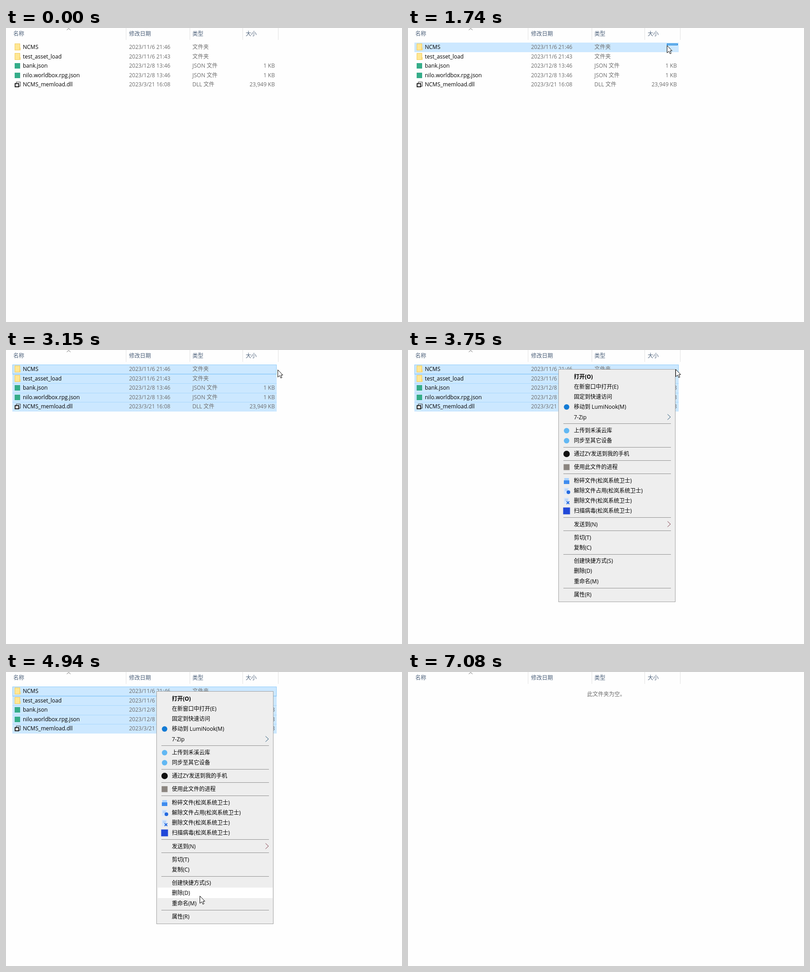
Animation, 869 px wide and 645 px high, one loop 7500 ms. Source, as an HTML page with a canvas:

```html
<!DOCTYPE html>
<html lang="zh-CN">
<head>
<meta charset="utf-8">
<title>文件夹</title>
<style>
html, body { margin: 0; width: 100%; height: 100%; overflow: hidden; background: #fefefe; }
canvas { display: block; }
</style>
</head>
<body>
<canvas id="stage" width="869" height="645"></canvas>
<script>
const ctx = document.getElementById('stage').getContext('2d');
const LOOP = 7500, TICK = 48;
const FONT = '12px "Open Sans", "Noto Sans CJK SC", "Noto Sans CJK", sans-serif';
const INK = '#000', GREY = '#6d6d6d', HEAD = '#4c607a';

const time = { drag: 1690, drop: 2200, menuOpen: 3750, menuClose: 5260, empty: 5730 };
const list = { left: 14, top: 32, width: 580, pitch: 20.5 };
const menu = { left: 330, top: 42, width: 257, height: 511, pitch: 22.25, gap: 6.95 };
const press = { x: 592, y: 34 };

const columns = [
  { label: '名称', x: 16, right: 263 },
  { label: '修改日期', x: 270, right: 403 },
  { label: '类型', x: 409, right: 519 },
  { label: '大小', x: 526, right: 597 }
];
const files = [
  { icon: 'folder', name: 'NCMS', date: '2023/11/6 21:46', kind: '文件夹' },
  { icon: 'folder', name: 'test_asset_load', date: '2023/11/6 21:43', kind: '文件夹' },
  { icon: 'json', name: 'bank.json', date: '2023/12/8 13:46', kind: 'JSON 文件', size: '1 KB' },
  { icon: 'json', name: 'nilo.worldbox.rpg.json', date: '2023/12/8 13:46', kind: 'JSON 文件', size: '1 KB' },
  { icon: 'dll', name: 'NCMS_memload.dll', date: '2023/3/21 16:08', kind: 'DLL 文件', size: '23,949 KB' }
];

// One string per menu group, entries split by "|", each "label" or "label;icon".
const menuGroups = [
  '打开(O)|在新窗口中打开(E)|固定到快速访问|移动到 LumiNook(M);cloud|7-Zip;more',
  '上传到禾溪云库;disk|同步至其它设备;disk',
  '通过ZY发送到我的手机;chat',
  '使用此文件的进程;lock',
  '粉碎文件(松岚系统卫士);shred|解除文件占用(松岚系统卫士);release|删除文件(松岚系统卫士);erase|扫描病毒(松岚系统卫士);scan',
  '发送到(N);send',
  '剪切(T)|复制(C)',
  '创建快捷方式(S)|删除(D)|重命名(M)',
  '属性(R)'
].map(group => group.split('|').map(entry => entry.split(';')));

const smooth = u => u * u * (3 - 2 * u);
const overshoot = u => 1 + 2.7 * (u - 1) ** 3 + 1.7 * (u - 1) ** 2;
const windUp = u => 2.7 * u ** 3 - 1.7 * u ** 2;

// Pointer moves chain from one resting place to the next; bow bends the path sideways.
const moves = [
  { start: 140, end: 820, from: [518, 648], to: [728, 227], bow: .63 },
  { start: 910, end: 1410, to: [360, -12] },
  { start: 1410, end: 1660, to: [592, 28], bow: -.1 },
  { start: 1690, end: 2020, to: [179, 200] },
  { start: 2200, end: 2920, from: [250, 33], to: [600, 43], ease: overshoot },
  { start: 2970, end: 3340, to: [587, 42] },
  { start: 4100, end: 4780, to: [425, 491] },
  { start: 6580, end: 7080, to: [441, 650], ease: windUp }
];
moves.forEach((move, i) => move.from = move.from || moves[i - 1].to);

function pointerAt(t) {
  const { start, end, from, to, bow = 0, ease = smooth } = moves.filter(m => m.start <= t).pop() || moves[0];
  const elapsed = Math.max(0, Math.floor((t - start) / TICK) * TICK);
  const u = t >= end ? 1 : ease(elapsed / (end - start));
  const dx = to[0] - from[0], dy = to[1] - from[1];
  const bend = 2 * u * (1 - u) * bow;
  return [from[0] + dx * u - dy * bend, from[1] + dy * u + dx * bend].map(Math.round);
}

function box(x, y, w, h, color) {
  ctx.fillStyle = color;
  ctx.fillRect(x, y, w, h);
}

function frame(x, y, w, h, color, width = 1) {
  ctx.strokeStyle = color;
  ctx.lineWidth = width;
  ctx.strokeRect(x + width / 2, y + width / 2, w - width, h - width);
}

function disc(x, y, r, color) {
  ctx.fillStyle = color;
  ctx.beginPath();
  ctx.arc(x, y, r, 0, Math.PI * 2);
  ctx.fill();
}

function square(x, y, side, color) {
  box(x - side / 2, y - side / 2, side, side, color);
}

function line(points, color, width = 1) {
  ctx.strokeStyle = color;
  ctx.lineWidth = width;
  ctx.beginPath();
  points.forEach(([x, y]) => ctx.lineTo(x, y));
  ctx.stroke();
}

function text(label, x, mid, color, align = 'left', weight = '') {
  ctx.font = weight + ' ' + FONT;
  ctx.textAlign = align;
  ctx.fillStyle = color;
  ctx.fillText(label, x, Math.round(mid + 4));
}

function page(x, y) {
  box(x - 6, y - 7, 11, 14, '#d9e8fc');
  for (const dy of [-4, -1]) box(x - 4, y + dy, 7, 1, '#8db9f2');
}

function chevron(y, color) {
  line([[569.5, y - 7], [576, y - 1], [569.5, y + 5]], color);
}

// Icons are drawn around their centre.
const icons = {
  folder(x, y) {
    box(x - 6, y - 8, 12, 15, '#ffe794');
    frame(x - 6, y - 8, 12, 15, '#f2cb5c');
    box(x + 4, y + 1, 3, 6, '#f7d777');
  },
  json: (x, y) => square(x, y, 12, '#35ad89'),
  dll(x, y) {
    frame(x - 3, y - 6, 10, 10, '#333');
    box(x - 6, y - 3, 10, 9, '#fff');
    frame(x - 6, y - 3, 10, 9, '#222', 2);
  },
  cloud: (x, y) => disc(x, y, 6, '#137bd5'),
  disk: (x, y) => disc(x, y, 6, '#62b8f3'),
  chat: (x, y) => disc(x, y, 7, '#111'),
  lock: (x, y) => square(x, y, 13, '#8b8580'),
  scan: (x, y) => square(x, y, 15, '#2148d8'),
  shred(x, y) {
    box(x - 5, y - 6, 10, 6, '#a9d2ff');
    box(x - 6, y - 1, 12, 8, '#3f8cee');
  },
  release(x, y) {
    page(x, y);
    disc(x + 4, y + 3, 4, '#2469df');
  },
  erase(x, y) {
    page(x, y);
    for (const s of [-3, 3]) line([[x + 3 - s, y + 1], [x + 3 + s, y + 7]], '#2469df', 2);
  },
  more: (x, y) => chevron(y, '#1b4f72'),
  send: (x, y) => chevron(y, '#7a3040')
};

function drawHeader(x, y) {
  let left = 0;
  for (const { label, x: textX, right } of columns) {
    if (y >= 0 && y < 26 && x >= left && x < right) box(left, 0, right - left, 26, '#d9ebf9');
    text(label, textX, 13, HEAD);
    box(right, 0, 1, 26, '#e2e2e2');
    left = right + 1;
  }
  line([[133.5, 4.5], [137.5, .8], [141.5, 4.5]], '#666');
}

function drawFiles(t, x, y) {
  const { left, width, pitch } = list;
  const dropped = t >= time.drop;
  const dragging = t >= time.drag && !dropped && y > press.y;
  files.forEach((file, i) => {
    const top = Math.round(list.top + pitch * i);
    const height = Math.round(list.top + pitch * (i + 1)) - top;
    const mid = list.top + pitch * i + 10;
    if (dropped || dragging && y > top) {
      box(left, top, width, height, '#cce8ff');
      if (i) box(left, top, width, 1, '#a9d8fc');
    } else if (t < time.drag && x >= left && x < left + width && y >= top && y < top + height) {
      box(left, top, width, height, '#e5f3ff');
    }
    icons[file.icon](25, Math.round(mid));
    text(file.name, 37, mid, INK);
    text(file.date, 270, mid, GREY);
    text(file.kind, 409, mid, GREY);
    text(file.size || '', 590, mid, GREY, 'right');
  });
  if (dropped) frame(left, list.top, width, 21, '#8fccfa');
  if (dragging) {
    const w = press.x - x, h = y - press.y;
    box(x, press.y, w, h, 'rgba(0,120,215,.33)');
    frame(x, press.y, w, h, '#0078d7');
  }
}

function drawMenu(x, y) {
  const { left, top, width, height, pitch, gap } = menu;
  const right = left + width;
  box(left, top, width, height, '#eee');
  frame(left, top, width, height, '#a0a0a0');
  let mid = top + 16.6;
  menuGroups.forEach((group, g) => {
    if (g) {
      box(left + 11, Math.round(mid - 8.4), width - 21, 1, '#919191');
      mid += gap;
    }
    group.forEach(([label, icon], i) => {
      const row = Math.round(mid);
      const hovered = x >= left + 3 && x < right - 2 && Math.abs(y - mid) < pitch / 2;
      if (hovered) box(left + 3, row - 12, width - 5, 23, '#fff');
      if (icon) icons[icon](348, row);
      text(label, left + 34, row, INK, 'left', g + i ? '' : 'bold');
      mid += pitch;
    });
  });
}

function drawPointer(x, y) {
  const outline = [[0, 0], [0, 16], [4, 12.5], [6.5, 18], [9, 17], [6.7, 11.5], [11, 11.5]];
  ctx.beginPath();
  outline.forEach(([dx, dy]) => ctx.lineTo(x + dx + .5, y + dy + .5));
  ctx.closePath();
  ctx.fillStyle = '#fff';
  ctx.fill();
  ctx.strokeStyle = '#000';
  ctx.lineWidth = 1;
  ctx.stroke();
}

function draw(t) {
  const [x, y] = pointerAt(t);
  box(0, 0, 869, 645, '#fefefe');
  drawHeader(x, y);
  if (t < time.empty) drawFiles(t, x, y);
  else text('此文件夹为空。', 393, 49, GREY);
  if (t >= time.menuOpen && t < time.menuClose) drawMenu(x, y);
  drawPointer(x, y);
}

const began = performance.now();
function tick() {
  draw((performance.now() - began) % LOOP);
  requestAnimationFrame(tick);
}
tick();
</script>
</body>
</html>
```
